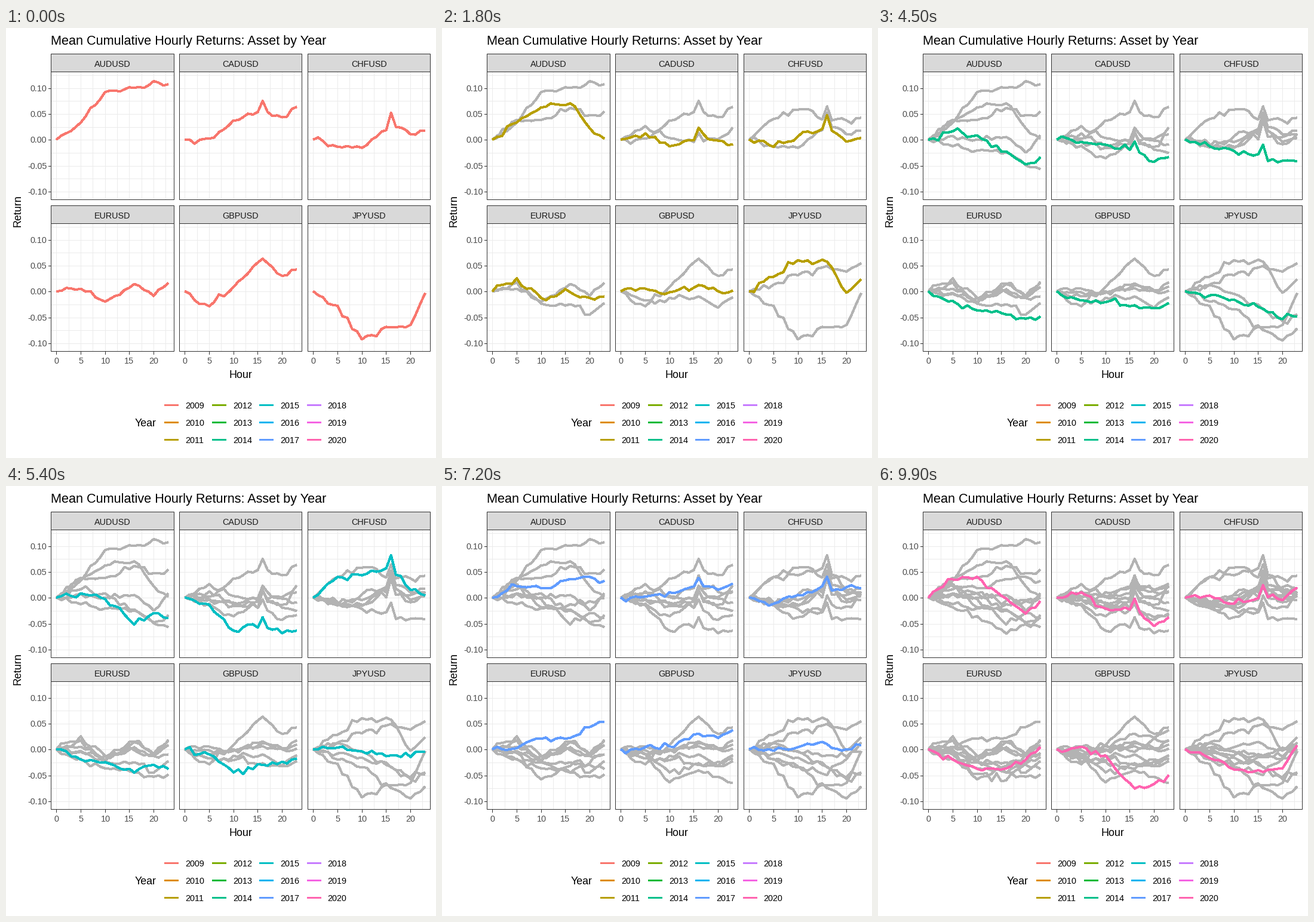
Write a matplotlib script that moves like this. It is 720 by 720 pixels and loops after 10 s.

```python
import matplotlib.pyplot as plt
import numpy as np
from matplotlib.animation import FuncAnimation
from matplotlib.patches import Rectangle

plt.rcParams["font.family"] = "Liberation Sans"

SIZE, DPI = 720, 100
PX = 72 / DPI  # points per pixel
PAIRS = ["AUDUSD", "CADUSD", "CHFUSD", "EURUSD", "GBPUSD", "JPYUSD"]
COLORS = ["#F8766D", "#DE8C00", "#B79F00", "#7CAE00", "#00BA38", "#00C08B",
          "#00BFC4", "#00B4F0", "#619CFF", "#C77CFF", "#F564E3", "#FF64B0"]
PAST, INK, GRID, MUTED = "#B3B3B3", "#333333", "#EBEBEB", "#4D4D4D"
LEFTS, RIGHTS = [75, 290, 505], [281, 495, 710]
TOPS, PANEL_H, STRIP_H = [72, 326], 214, 30
HOUR_W, UNIT_H = 8.135, 0.866  # pixels per hour and per 0.001 return

HOURS = np.arange(24)
KEY_HOURS = [0, 5, 10, 16, 20, 23]
FIXING_HOUR = 16
FIXING_JUMP = {"CADUSD": 18, "CHFUSD": 22}
WIGGLE = 3.5
rng = np.random.default_rng(7)

# Returns in thousandths at the key hours after midnight, one row per pair.
KEY_POINTS = {
    2009: ([33, 92, 100, 113, 107], [2, 37, 57, 43, 63], [-14, -16, 30, 10, 17],
           [5, -20, 14, -9, 16], [-29, 8, 63, 30, 42], [-28, -93, -70, -65, -4]),
}


def curve(pair, keys):
    """Straight runs between key points with a small hourly wiggle."""
    values = np.interp(HOURS, KEY_HOURS, [0, *keys])
    wiggle = rng.normal(0, WIGGLE, len(HOURS))
    wiggle[KEY_HOURS] = 0
    values += wiggle
    values[FIXING_HOUR] += FIXING_JUMP.get(pair, 0)
    return values


years = []


def add_year(*rows):
    years.append([curve(pair, keys) for pair, keys in zip(PAIRS, rows)])


add_year(*KEY_POINTS[2009])
add_year([38, 38, 61, 47, 54], [26, 3, -5, 1, 23], [40, 58, 42, 37, 42],
         [17, -24, -25, -45, -23], [-18, -13, -10, -32, -12], [13, 31, 49, 38, 54])
add_year([33, 62, 70, 22, 2], [12, -13, 5, -2, -9], [-14, 6, 25, -4, 3],
         [25, -13, -2, -13, -10], [5, -2, 12, 0, 1], [28, 60, 57, -3, 23])
add_year([7, 0, 5, -25, 8], [-3, -16, -3, -14, 10], [-9, -14, 15, -9, 11],
         [-4, -23, 4, -13, 8], [-2, 0, 6, 1, 17], [12, -5, -35, -58, -45])
add_year([-13, -21, -25, -50, -57], [-12, -36, -5, -20, -26], [-15, -5, 20, 5, 10],
         [-5, -14, 15, -10, 18], [-10, -3, 15, 2, 9], [-20, -35, -75, -95, -72])
add_year([16, 8, -23, -48, -34], [-5, -10, -22, -43, -34], [-13, -22, -32, -41, -42],
         [-19, -37, -45, -53, -49], [-18, -21, -27, -33, -23], [-8, -16, -34, -54, -49])
add_year([8, -3, -52, -30, -40], [-14, -64, -56, -69, -64], [40, 43, 60, 15, 4],
         [-20, -25, -45, -30, -38], [-10, -45, -30, -24, -18], [3, -4, -12, -15, -5])
add_year([26, -19, -13, -7, -1], [9, 1, 25, 11, 12], [-14, -38, -18, -17, -5],
         [-7, -58, -32, -27, -10], [-9, -64, -41, -53, -65], [-19, -33, -50, -19, 13])
add_year([22, 18, 36, 40, 32], [2, 10, 20, 15, 27], [-12, 5, 18, 20, 18],
         [2, 20, 22, 43, 53], [4, 5, 30, 22, 37], [-3, 4, 10, 0, 8])
add_year([-19, -36, -70, -52, -39], [-5, -22, -30, -38, -31], [-20, -18, 0, 2, 3],
         [-10, -48, -60, -28, -15], [-25, -24, -38, -20, -20], [-8, -30, -15, -18, 0])
add_year([7, 8, -6, -5, 0], [1, 1, 12, 13, 21], [-7, -2, 10, 17, 9],
         [-2, -23, -37, -10, -7], [-13, 8, -5, 21, 17], [-5, -12, -12, 3, 5])
add_year([35, 40, -2, -31, -7], [10, -21, -20, -55, -38], [4, -12, 2, -5, 19],
         [-20, -38, -37, -20, 4], [5, -12, -76, -67, -50], [-17, -39, -44, -37, 7])

# Axes units are pixel indices; the shift keeps snapped lines on their pixel.
fig = plt.figure(figsize=(SIZE / DPI, SIZE / DPI), dpi=DPI, facecolor="white")
ax = fig.add_axes([0, 0, 1, 1])
ax.set_xlim(-0.4, SIZE - 0.4)
ax.set_ylim(SIZE - 0.6, -0.6)
ax.axis("off")


def stroke(xs, ys, color, width=1, **kw):
    return ax.plot(xs, ys, color=color, lw=width * PX, antialiased=False,
                   solid_capstyle="butt", solid_joinstyle="round", **kw)[0]


def label(x, y, text, size=14.4, color="black", ha="left", **kw):
    ax.text(x, y, text, fontsize=size * PX, color=color, ha=ha, va="baseline", **kw)


def box(x0, y0, x1, y1, fill):
    ax.add_patch(Rectangle((x0, y0), x1 - x0, y1 - y0, facecolor=fill,
                           edgecolor=INK, lw=PX, zorder=5))


def hour_x(col, hour):
    return LEFTS[col] + 9.2 + HOUR_W * hour


def value_y(row, thousandths):
    return TOPS[row] + 114.2 - UNIT_H * thousandths


def draw_panel(index, name):
    row, col = divmod(index, 3)
    left, right, top = LEFTS[col], RIGHTS[col], TOPS[row]
    bottom = top + PANEL_H
    for hour in np.arange(0, 23, 2.5):
        stroke([round(hour_x(col, hour))] * 2, [top, bottom], GRID, zorder=1)
    for value in range(-100, 126, 25):
        stroke([left, right], [round(value_y(row, value))] * 2, GRID, zorder=1)
    box(left, top, right, bottom, "none")
    box(left, top - STRIP_H, right, top, "#D9D9D9")
    label((left + right) / 2, top - 8, name, color="#1A1A1A", ha="center", zorder=6)
    if col == 0:
        for value in range(-100, 101, 50):
            y = round(value_y(row, value))
            stroke([left - 4, left], [y, y], INK)
            label(68, y + 5, f"{value / 1000:.2f}", color=MUTED, ha="right")
    if row == 1:
        for hour in range(0, 21, 5):
            x = round(hour_x(col, hour))
            stroke([x, x], [bottom, bottom + 5], INK)
            label(x, 561, hour, color=MUTED, ha="center")


for i, pair in enumerate(PAIRS):
    draw_panel(i, pair)

label(75, 27, "Mean Cumulative Hourly Returns: Asset by Year", 21.6)
label(393, 585, "Hour", 17.9, ha="center")
label(24, 306, "Return", 17.9, ha="center", rotation=90, rotation_mode="anchor")
label(215, 666, "Year", 17.9)
for i, color in enumerate(COLORS):
    col, row = divmod(i, 3)
    x, y = 265 + 79.4 * col, 630 + 29 * row
    stroke([x, x + 23], [y, y], color, 3)
    label(x + 35, y + 6, 2009 + i)

lines = [[stroke(hour_x(p % 3, HOURS), value_y(p // 3, values), color, 3, zorder=3)
          for p, values in enumerate(curves)]
         for curves, color in zip(years, COLORS)]


def update(frame):
    current = frame // 9  # each year holds for nine ticks
    for i, year_lines in enumerate(lines):
        for line in year_lines:
            line.set_visible(i <= current)
            line.set_color(COLORS[i] if i == current else PAST)
    return [line for year_lines in lines for line in year_lines]


anim = FuncAnimation(fig, update, frames=100, interval=100, repeat=True,
                     repeat_delay=0, blit=False)
plt.show()
```
